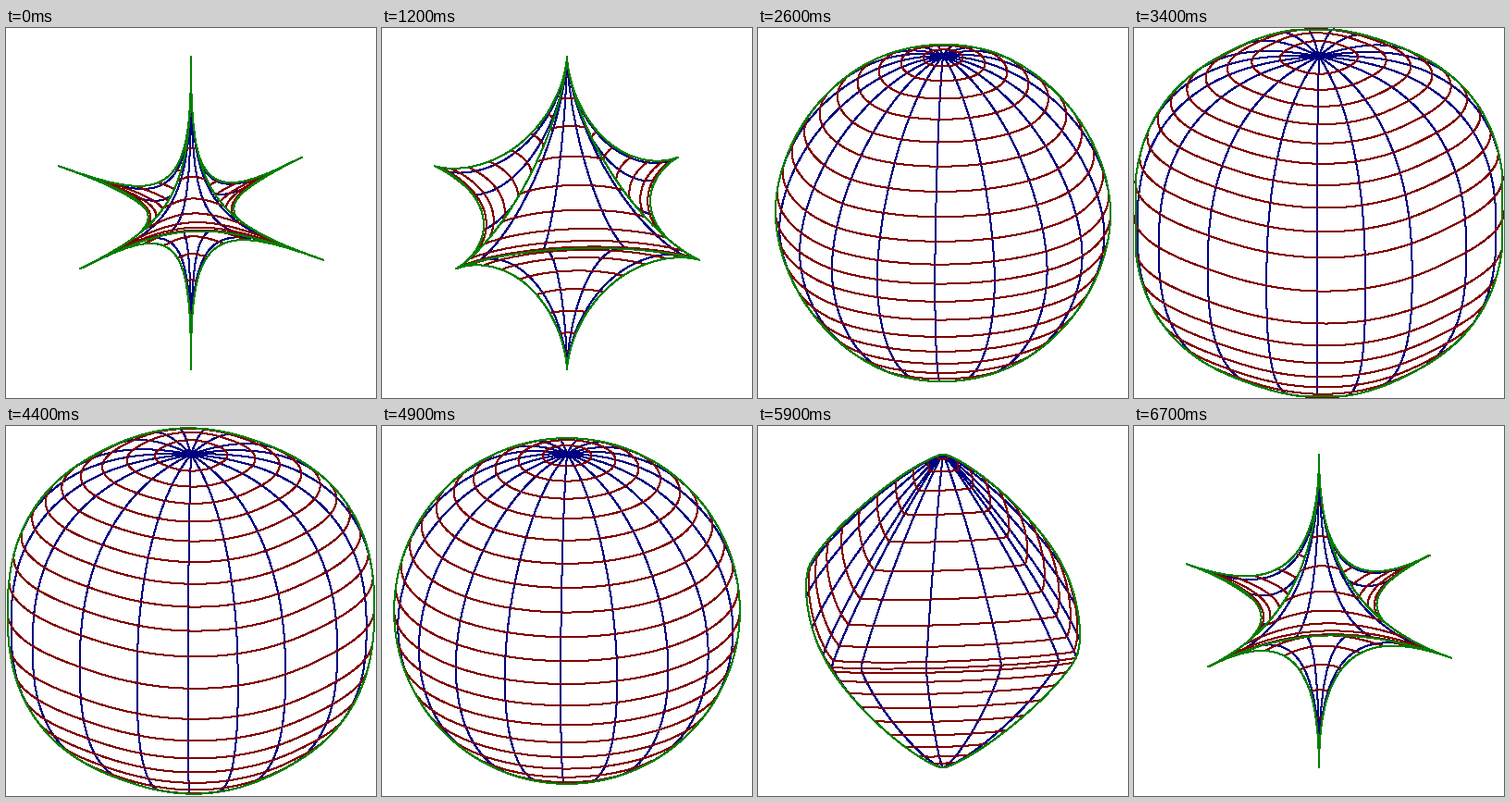
A matplotlib script that plays this animation: 400 px wide and 400 px high, repeating every 6.8 s.

```python
import numpy as np
import matplotlib.pyplot as plt
from matplotlib.animation import FuncAnimation

SIZE, DPI = 400, 100
RADIUS = 187
EDGE_LIMIT = 198.4
STEPS, HOLD = 25, 10
AZIM, ELEV = np.radians(40), np.radians(25)

# Rows: screen right, screen up, towards the viewer
VIEW = np.array([
    [-np.sin(AZIM), np.cos(AZIM), 0],
    [-np.sin(ELEV) * np.cos(AZIM), -np.sin(ELEV) * np.sin(AZIM), np.cos(ELEV)],
    [np.cos(ELEV) * np.cos(AZIM), np.cos(ELEV) * np.sin(AZIM), np.sin(ELEV)],
])
EYE = VIEW[2]

LON = np.linspace(0, 2 * np.pi, 20)[:-1]
LAT = np.linspace(-np.pi / 2, np.pi / 2, 23)[1:-1]
FINE_LON = np.linspace(0, 2 * np.pi, 721)
FINE_LAT = np.linspace(-np.pi / 2, np.pi / 2, 481)


def signed_pow(a, e):
    a = np.where(np.abs(a) < 1e-12, 0, a)
    return np.sign(a) * np.abs(a) ** e


def surface(lon, lat, p):
    """Points on |x|^p + |y|^p + |z|^p = 1."""
    e = 2 / p
    c = signed_pow(np.cos(lat), e)
    pts = (c * signed_pow(np.cos(lon), e),
           c * signed_pow(np.sin(lon), e),
           signed_pow(np.sin(lat), e) + 0 * lon)
    return np.stack(pts, axis=-1)


def visible(pts, p):
    size = np.maximum(np.abs(pts), 1e-12)
    facing = (np.sign(pts) * size ** (p - 1)) @ EYE >= 0
    if p > 1:
        return facing
    # Concave case: a sight line can only be blocked at a coordinate plane
    seen = facing | (np.abs(pts) < 1e-12).any(axis=-1)
    for i in range(3):
        t = -pts[..., i] / EYE[i]
        hit = pts + t[..., None] * EYE
        hit[..., i] = 0
        level = (np.abs(hit) ** p).sum(axis=-1)
        seen &= ~((t > 1e-6) & (level < 1 - 1e-6))
    return seen


def project(pts):
    return RADIUS * (pts @ VIEW[:2].T)


def join(curves, p):
    """Flatten a stack of curves into one line with gaps at hidden parts."""
    xy = np.where(visible(curves, p)[..., None], project(curves), np.nan)
    gap = np.full((len(xy), 1, 2), np.nan)
    return np.concatenate([xy, gap], axis=1).reshape(-1, 2)


def ridges(p):
    t = np.linspace(0, 2 * np.pi, 1441)
    a, b = signed_pow(np.cos(t), 2 / p), signed_pow(np.sin(t), 2 / p)
    z = np.zeros_like(t)
    rings = [(a, b, z), (a, z, b), (z, a, b)]
    return np.array([np.stack(r, axis=-1) for r in rings])


def silhouette(p):
    t = np.linspace(0, 2 * np.pi, 3001)[:, None]
    n = np.cos(t) * VIEW[0] + np.sin(t) * VIEW[1]
    n /= np.abs(n).max(axis=1, keepdims=True)
    pts = signed_pow(n, 1 / (p - 1))
    pts /= (np.abs(pts) ** p).sum(axis=1, keepdims=True) ** (1 / p)
    return np.clip(project(pts), -EDGE_LIMIT, EDGE_LIMIT)


def build(step):
    p = 0.4 + 2.1 * step / STEPS
    meridians = surface(LON[:, None], FINE_LAT[None, :], p)
    parallels = surface(FINE_LON[None, :], LAT[:, None], p)
    edge = silhouette(p) if p > 1 else join(ridges(p), p)
    return join(meridians, p), join(parallels, p), edge


SHAPES = [build(s) for s in range(STEPS + 1)]
FRAMES = 2 * (STEPS + HOLD - 1)

fig = plt.figure(figsize=(SIZE / DPI, SIZE / DPI), dpi=DPI, facecolor="white")
ax = fig.add_axes([0, 0, 1, 1])
ax.set_xlim(-SIZE / 2, SIZE / 2)
ax.set_ylim(-SIZE / 2, SIZE / 2)
ax.axis("off")


def pen(color):
    # Without antialiasing a one pixel stroke fills about two pixels
    return ax.plot([], [], color=color, lw=72 / DPI, antialiased=False,
                   solid_joinstyle="round", solid_capstyle="butt")[0]


lines = [pen("#000080"), pen("#800000"), pen("#008000")]


def step_at(n):
    half = FRAMES // 2
    if n < half:
        return max(0, n - HOLD + 1)
    return STEPS - max(0, n - half - HOLD + 1)


def draw(n):
    for line, xy in zip(lines, SHAPES[step_at(n)]):
        line.set_data(xy[:, 0], xy[:, 1])
    return lines


def reset():
    return draw(0)


anim = FuncAnimation(fig, draw, frames=FRAMES, init_func=reset, interval=100,
                     repeat=True, repeat_delay=0, blit=False)
plt.show()
```
